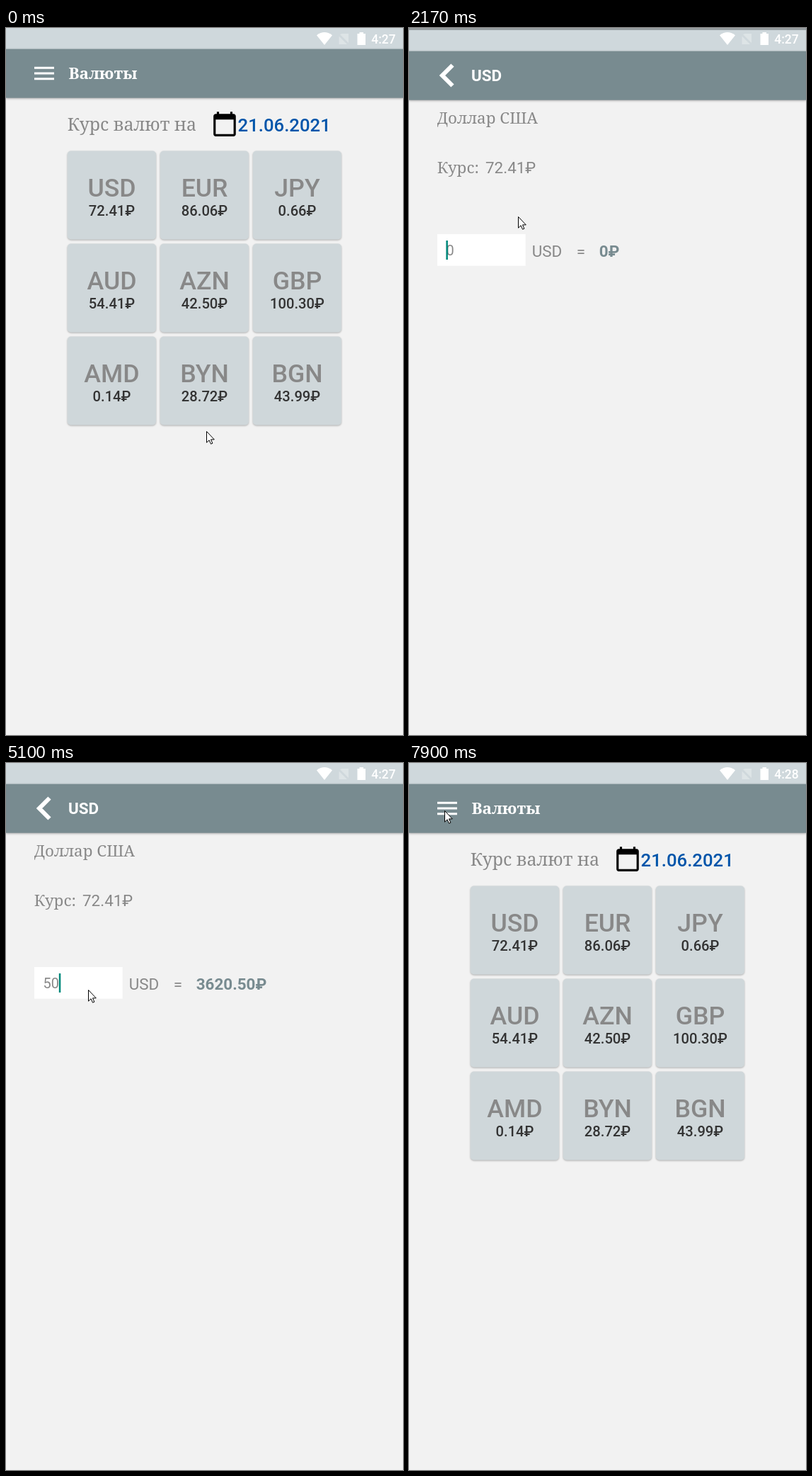
Recreate the animation shown at these times as an HTML page. Size 561 px wide and 998 px high, loop 8000 ms.

```html
<!DOCTYPE html>
<html lang="ru">
<head>
<meta charset="utf-8">
<title>Валюты</title>
<style>
  html, body { margin: 0; width: 100%; height: 100%; overflow: hidden; background: #f2f2f2; }
  svg { display: block; width: 100%; height: 100%; }
  text { font: 22.44px Roboto, sans-serif; fill: #888; }
  .serif { font-family: "Noto Serif", serif; }
  .title { font-weight: 700; fill: #fff; }
  .code { font-size: 35.7px; font-weight: 500; text-anchor: middle; }
  .price { font-size: 20.2px; font-weight: 500; text-anchor: middle; fill: #333; }
  .date { font-size: 25.7px; font-weight: 500; fill: #0055aa; }
  .input { font-size: 19.95px; }
  .sum { font-weight: 700; fill: #788b90; }
  .clock { font-size: 17.45px; font-weight: 500; fill: #fff; }
  .bar { fill: #788b90; filter: drop-shadow(0 1.5px 1.5px rgba(0,0,0,.3)); }
  .card { fill: #cfd7da; filter: drop-shadow(0 1px 1px rgba(0,0,0,.28)); }
  .card.pressed { filter: drop-shadow(0 1.5px 2.5px rgba(0,0,0,.38)); }
</style>
</head>
<body>
<svg viewBox="0 0 561 998">
  <g id="list">
    <rect width="561" height="998" fill="#f2f2f2"/>
    <rect width="561" height="30" fill="#cfd8dc"/>
    <rect class="bar" y="29.7" width="561" height="69"/>
    <path d="M40 56.2h28M40 64h28M40 71.8h28" stroke="#fff" stroke-width="3.1"/>
    <text class="serif title" x="88.5" y="72">Валюты</text>
    <text class="serif" x="86.7" y="145" style="font-size:24.93px">Курс валют на</text>
    <path transform="translate(290 116.6) scale(1.58)" d="M20 3h-1V1h-2v2H7V1H5v2H4c-1.1 0-2 .9-2 2v16c0 1.1.9 2 2 2h16c1.1 0 2-.9 2-2V5c0-1.1-.9-2-2-2zm0 18H4V8h16v13z"/>
    <text class="date" x="327.6" y="146">21.06.2021</text>
    <g id="cards"></g>
  </g>
  <rect id="scrim" width="561" height="998"/>
  <g id="detail">
    <rect width="561" height="998" fill="#f2f2f2"/>
    <rect width="561" height="30" fill="#cfd8dc"/>
    <rect class="bar" y="29.7" width="561" height="69"/>
    <path d="M61.5 49.5L47 64l14.5 14.5" fill="none" stroke="#fff" stroke-width="6"/>
    <text class="title" x="88" y="72">USD</text>
    <text class="serif" x="39.7" y="132">Доллар США</text>
    <text class="serif" x="39.7" y="201.5">Курс:</text>
    <text x="108" y="202">72.41₽</text>
    <rect x="40" y="288" width="124.7" height="44.7" fill="#fff"/>
    <text class="input" id="amount" x="52.5" y="318"></text>
    <rect id="caret" y="297" width="2.5" height="27" fill="#00897b"/>
    <path id="handle" d="M64.5 324.5l8.5 8.5a12 12 0 1 1-17 0z" fill="#00897b"/>
    <text x="173.7" y="320">USD</text>
    <text x="236.7" y="320">=</text>
    <text class="sum" id="sum" x="268.7" y="320"></text>
  </g>
  <g fill="#fff">
    <path d="M450 24L439 10.2q11-8.4 22 0z"/>
    <path d="M475 8h9v13l-12-12zM470.5 11.5V23H482z" opacity=".3"/>
    <path d="M496.5 8h3V6h5.500v2h3v16h-11.500z"/>
    <text class="clock" id="clock" x="516.3" y="22"></text>
  </g>
  <path id="cursor" d="M.5.5v15.700l3.600-3.400 2.400 5.400 2.400-1-2.400-5.300h4.800z" fill="#fff" stroke="#000"/>
</svg>
<script>
const LOOP = 8000, STEP = 1000 / 15, RATE = 72.41;
const $ = id => document.getElementById(id);

const rates = [["USD", 72.41], ["EUR", 86.06], ["JPY", .66], ["AUD", 54.41], ["AZN", 42.5],
               ["GBP", 100.3], ["AMD", .14], ["BYN", 28.72], ["BGN", 43.99]];
$("cards").innerHTML = rates.map(([code, rate], i) => {
  const x = i % 3 * 131, y = Math.floor(i / 3) * 131;
  return `<g transform="translate(${x} ${y})">
    <rect class="card" x="86.8" y="173.5" width="125.200" height="125" rx="5"/>
    <text class="code" x="149.5" y="238">${code}</text>
    <text class="price" x="149.5" y="265">${rate.toFixed(2)}₽</text></g>`;
}).join("");
const usdCard = document.querySelector(".card");

// Pointer moves: start, end, from, bend, to
const moves = [
  [500, 1300, [283, 569], [218, 417], [154, 266]],
  [2830, 3170, [154, 266], [135, 293], [116, 320]],
  [5830, 6630, [116, 320], [-28, 90], [66, 67]],
  [7700, 7900, [66, 67], [58, 67], [50, 67]]
];
const caretOn = [[2170, 2630], [3130, 4100], [4430, 5630], [6130, 6630], [7230, LOOP]];

const within = (t, a, b) => t >= a && t < b;

function pointer(t) {
  const [start, end, a, b, c] = moves.findLast(m => t >= m[0]) || moves[0];
  const count = Math.round((end - start) / STEP) + 1;
  const done = t < start ? 0 : Math.floor((t - start + 4) / STEP) + 1;
  const p = Math.min(1, done / count), e = p * p * (3 - 2 * p);
  return a.map((v, i) => Math.round(v * (1 - e) ** 2 + 2 * b[i] * e * (1 - e) + c[i] * e * e));
}

function draw(t) {
  const opening = within(t, 2170, 2230), closing = within(t, 7230, 7300);
  const amount = t < 4430 ? "0" : t < 4830 ? "" : t < 5100 ? "5" : "50";
  const caretPos = t < 3630 ? 0 : amount.length;

  usdCard.classList.toggle("pressed", within(t, 1770, 2170));
  $("scrim").setAttribute("opacity", opening ? .27 : closing ? .13 : 0);
  $("detail").setAttribute("display", within(t, 2170, 7300) ? "inline" : "none");
  $("detail").setAttribute("transform", `translate(0 ${opening ? 3 : closing ? 5.7 : 0})`);
  $("detail").setAttribute("opacity", closing ? .78 : 1);

  $("amount").textContent = amount;
  $("sum").textContent = (+amount ? (amount * RATE).toFixed(2) : "0") + "₽";
  $("caret").setAttribute("x", 52.4 + caretPos * 11.2);
  $("caret").setAttribute("opacity", caretOn.some(([a, b]) => within(t, a, b)) ? 1 : 0);
  $("handle").setAttribute("opacity",
    within(t, 3830, 4430) ? 1 : within(t, 3770, 4500) ? .5 : 0);

  $("clock").textContent = t < 6830 ? "4:27" : "4:28";
  $("cursor").setAttribute("transform", `translate(${pointer(t)})`);
}

const begin = performance.now();
function frame() {
  draw((performance.now() - begin) % LOOP);
  requestAnimationFrame(frame);
}
frame();
</script>
</body>
</html>
```
